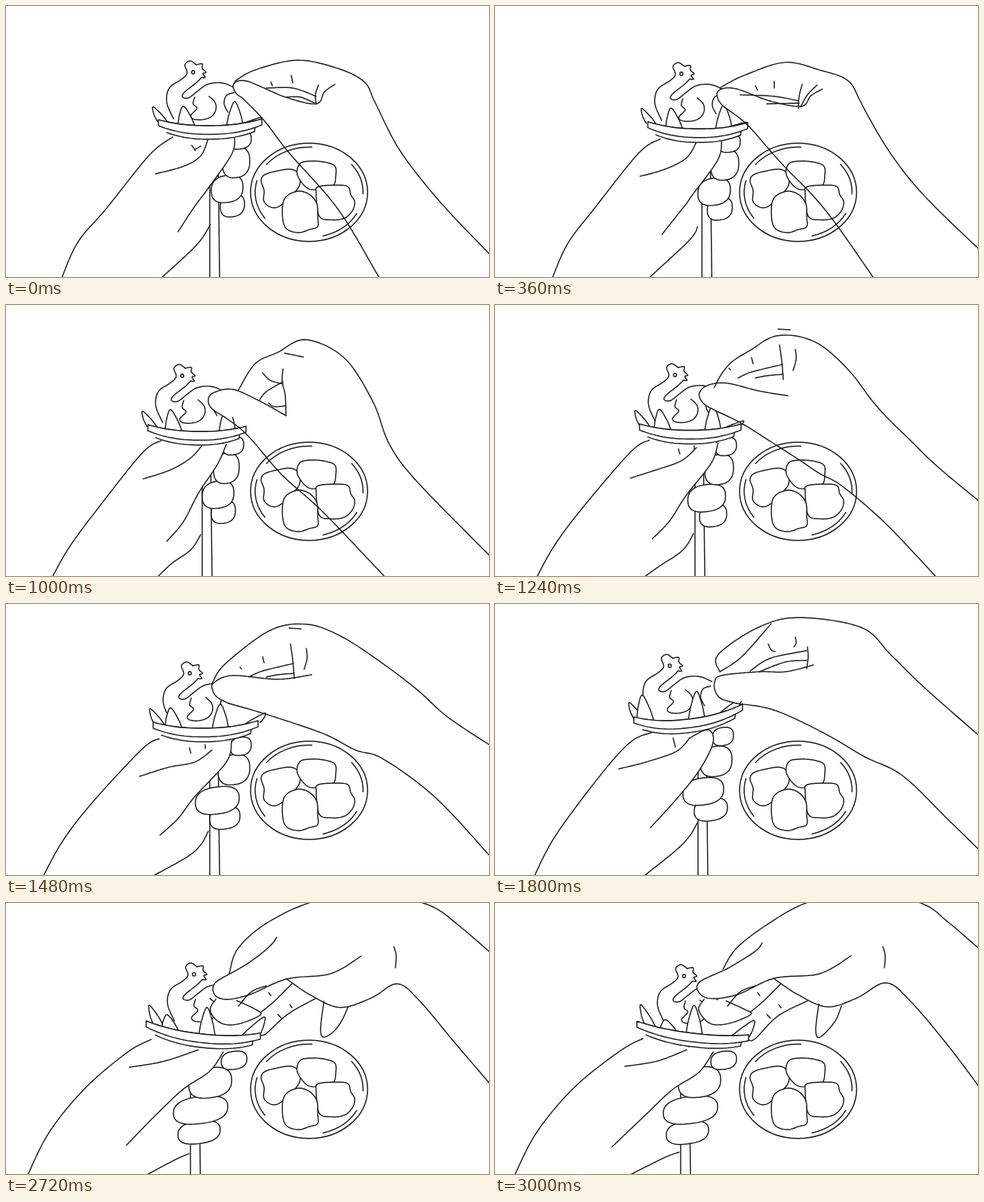
These frames come from a looping animation (640x360 px, 3.04 s). An HTML page with a canvas:

```html
<!DOCTYPE html>
<html lang="en">
<head>
<meta charset="utf-8">
<title>Hands arranging food</title>
<style>
html, body { margin: 0; width: 100%; height: 100%; overflow: hidden; background: #fff; }
canvas { display: block; width: 100vw; height: 100vh; }
</style>
</head>
<body>
<canvas width="640" height="360"></canvas>
<script>
const LOOP = 3040, SAMPLES = 90;
const ctx = document.querySelector('canvas').getContext('2d');

const lerp = (a, b, k) => a + (b - a) * k;
const blend = (a, b, k) => Array.isArray(a) ? a.map((v, i) => blend(v, b[i], k)) : lerp(a, b, k);
const points = s => s.split(' ').map(p => p.split(',').map(Number));

// Catmull-Rom spline as a fine polyline
function smooth(pts) {
  const out = [pts[0]];
  for (let i = 0; i < pts.length - 1; i++) {
    const b = pts[i], c = pts[i + 1], a = pts[i - 1] || b, d = pts[i + 2] || c;
    for (let u = 0.1; u < 1.05; u += 0.1) {
      out.push([0, 1].map(n => b[n] + u / 2 * (c[n] - a[n] +
        u * (2 * a[n] - 5 * b[n] + 4 * c[n] - d[n] + u * (3 * (b[n] - c[n]) + d[n] - a[n])))));
    }
  }
  return out;
}

// Evenly spaced points, so that strokes of two poses can blend
function resample(pts) {
  const len = [0];
  for (let i = 1; i < pts.length; i++) {
    len.push(len[i - 1] + Math.hypot(pts[i][0] - pts[i - 1][0], pts[i][1] - pts[i - 1][1]));
  }
  const step = len[len.length - 1] / SAMPLES;
  let i = 1;
  return Array.from({ length: SAMPLES + 1 }, (_, n) => {
    while (i < pts.length - 1 && len[i] < n * step) i++;
    return blend(pts[i - 1], pts[i], (n * step - len[i - 1]) / (len[i] - len[i - 1] || 1));
  });
}

const curve = s => smooth(points(s));
function loop(s) {
  const p = points(s);
  return smooth([...p.slice(-2), ...p, p[0], p[1]]).slice(20, -10);
}

// Key points of each pose; beads are x, y and half width, leaves are their tips.
const poses = [
  { at: 0, eye: '248,88', plate: '202,151 270,159 339,150', rod: '270,0',
    leaves: '195,134 235,133 303,127 338,148', beads: '310,178,15 305,208,18 293,243,21 300,265,16',
    arm: '72,366 95,314 133,269 190,198 221,174', fold: '198,223 235,213 258,199 268,176',
    grip: '303,174 299,197 268,242 248,269 228,300', palm: '207,360 240,330 258,311 271,290',
    top: '303,100 330,85 386,72 440,83 475,101 489,128 522,192 575,260 644,333',
    thumb: '436,104 422,114 411,130 370,121 320,100 302,103 304,115 313,122',
    edge: '313,122 342,152 375,195 440,270 494,360 520,404',
    creases: '345,109 380,109 411,120;372,121 390,121 409,129;411,130 410,118 414,105;351,101 353,106;378,92 380,102;246,185 251,192;250,191 258,186' },
  { at: 680, eye: '246,92', plate: '203,156 265,167 331,159', rod: '278,0',
    leaves: '194,138 232,138 303,135 327,160', beads: '311,186,14 304,214,19 288,250,22 296,273,17',
    arm: '76,366 97,318 132,267 190,194 217,179', fold: '187,229 215,221 250,204 267,183',
    grip: '298,183 292,211 258,256 248,271 215,307', palm: '204,360 235,331 262,307 266,296',
    top: '293,117 330,98 380,77 425,88 463,99 488,140 535,212 575,257 644,319',
    thumb: '432,116 415,124 402,136 360,131 315,117 291,121 289,133 298,147',
    edge: '298,147 330,166 385,222 430,266 507,360 540,400',
    creases: '325,118 370,120 402,126;360,130 403,129;402,136 403,120 407,104;405,134 414,118 427,105;345,106 348,112;370,100 370,109' },
  { at: 1000, eye: '233.5,94', plate: '188,159 255,168 318,161', rod: '260,0',
    leaves: '181,141 218,139 293,133 314,163', beads: '301,187,14 292,217,17 281,252,21 288,275,16',
    arm: '59,366 85,320 132,257 182,195 206,180', fold: '182,231 218,219 245,203 261,185',
    grip: '292,185 280,212 255,250 235,288 213,314', palm: '202,360 220,343 245,325 258,305',
    top: '308,113 330,78 360,63 397,46 448,70 486,128 508,185 545,235 645,337',
    thumb: '371,147 335,127 300,112 274,117 268,127 273,138 290,149',
    edge: '290,149 320,173 365,225 420,275 501,360 535,395',
    creases: '369,64 394,69;340,90 350,100 367,105;336,126 345,115 367,102;371,147 370,120 366,102 367,85;348,130 355,135 370,134' },
  { at: 1480, eye: '243.5,92', plate: '195,157 265,165 334,155', rod: '270,0',
    leaves: '191,139 218,138 284,133 343,145', beads: '311,189,14 302,220,21 280,261,29 290,284,20',
    arm: '47,366 75,315 115,263 180,193 203,179', fold: '177,229 215,217 250,210 273,194',
    grip: '299,182 292,210 250,256 228,285 204,307', palm: '197,360 240,336 258,320 268,302',
    top: '273,106 290,80 350,35 399,27 444,43 495,76 545,114 585,150 645,190',
    thumb: '405,94 360,100 300,95 275,105 274,115 280,124 295,132',
    edge: '295,132 343,146 420,172 463,194 500,206 570,258 645,339',
    creases: '375,32 391,33;322,97 340,89 381,79;345,97 360,94 382,92;382,99 380,75 377,53;398,59 399,72 395,87;310,84 312,86;340,70 342,78;243,191 245,198;264,187 264,192' },
  { at: 1800, eye: '231.5,82', plate: '184,150 257,153 328,133', rod: '269,0',
    leaves: '178,131 195,121 267,116 326,125', beads: '302,176,14 293,209,21 276,249,27 286,273,22',
    arm: '50,366 80,308 140,227 180,183 210,170', fold: '164,219 200,210 240,196 258,178',
    grip: '258,178 282,167 289,184 270,222 238,262 206,297', palm: '199,360 240,327 258,308 268,291',
    top: '298,90 295,68 345,33 400,18 485,31 525,68 570,112 645,178',
    thumb: '422,81 385,90 350,90 300,95 291,104 292,116 300,126 320,132',
    edge: '320,132 370,141 435,171 490,203 540,228 600,286 645,330',
    creases: '298,90 327,70 366,26;338,89 365,72 413,62;350,90 385,77 413,75;413,86 415,70 414,57;362,53 366,61 371,63;398,44 399,52 396,57;236,178 239,190' },
  { at: 2280, eye: '247,91', plate: '182,156 260,176 339,169', rod: '242,0',
    leaves: '185,137 194,138 270,143 341,144', beads: '301,209,17 270,240,29 256,275,36 257,304,28',
    arm: '31,366 60,305 105,247 155,200 187,183', fold: '150,220 195,212 256,195',
    grip: '286,198 270,221 235,246 200,279 167,318', palm: '200,360 220,348 241,336',
    top: '286,104 284,65 318,26 384,0 455,-14 533,0 580,22 645,76',
    thumb: '469,71 430,94 375,102 325,122 288,130 278,114 310,91 345,62 366,34',
    edge: '375,101 405,122 445,140 490,127 518,109 545,130 590,185 645,238',
    meat: '280,127 271,144 283,158 303,162 334,150 328,140 305,129',
    finger: '404,122 380,138 360,151 341,166', pinky: '409,125 404,165 408,179 425,172 444,141',
    creases: '376,103 352,125 336,140;518,66 519,75 516,84;313,133 327,130 345,123;305,69 312,79;317,55 321,61;268,224 284,221' },
  { at: 3000, eye: '250.5,97', plate: '188,157 262,173 336,175', rod: '246,0',
    leaves: '193,135 226,155 264,136 343,156', beads: '303,209,17 271,238,28 259,275,36 255,305,28',
    arm: '24,366 55,305 105,245 165,197 196,180', fold: '172,217 215,210 254,195',
    grip: '289,198 270,225 235,248 200,281 155,324', palm: '181,360 225,338 244,331',
    top: '302,88 320,60 360,29 412,0 485,-18 564,0 600,25 645,64',
    thumb: '472,70 430,94 370,100 320,122 280,126 269,107 310,86 345,64 354,53',
    edge: '369,100 400,121 440,138 480,126 518,106 550,130 600,189 645,249',
    meat: '277,128 270,142 285,160 310,160 339,148 330,141 306,130',
    finger: '414,130 375,150 345,180 336,182', pinky: '429,134 425,170 431,178 450,158 459,137',
    creases: '379,107 355,131 338,145;514,58 517,70 516,86;308,137 325,118 345,110;360,148 365,153;376,135 379,139;348,119 351,123' }
];

const RAW = ['eye', 'plate', 'rod', 'leaves', 'beads'];
const keys = poses.map(({ at, creases, ...rest }) => {
  const key = { at, creases: creases.split(';').map(curve), parts: {} };
  for (const [name, s] of Object.entries(rest)) {
    key.parts[name] = RAW.includes(name) ? points(s) : resample(curve(s));
  }
  return key;
});

// The bird, measured from its eye
const bird = [
  '4,-10 -4,-15 -11,-10 -8,1 -15,9 -30,19 -35,31 -34,44 -26,62',
  '11,7 4,14 -12,27 -14,33 -6,34 6,25 17,17 29,14 42,15 56,21',
  '4,-10 12,-11 12,-5 17,0 13,2 16,7 11,7',
  '21,32 29,40 30,50 24,59 12,63 0,62 -3,57 5,48 0,42 2,33',
  '54,27 44,31 41,42 46,53'
].map(curve);

const food = [
  '338,232 343,224 360,219 378,217 388,224 388,240 368,262 354,268 342,260 342,245',
  '390,209 407,206 425,208 436,213 437,225 433,239 412,244 398,241 386,224',
  '411,249 414,240 438,238 453,240 457,251 462,260 459,272 448,282 430,284 415,279',
  '367,262 374,251 389,246 403,251 412,263 413,280 413,293 402,297 388,301 373,297 367,285'
].map(loop);

function draw(pts, filled) {
  ctx.beginPath();
  pts.forEach(p => ctx.lineTo(p[0], p[1]));
  if (filled) ctx.fill();
  ctx.stroke();
}

function arc(rx, ry, from, to) {
  ctx.beginPath();
  ctx.ellipse(401.6, 247.5, rx, ry, 0, from * Math.PI / 180, to * Math.PI / 180);
  ctx.stroke();
}

function drawDish() {
  arc(77.5, 65.2, 0, 360);
  for (const [from, to] of [[218, 273], [145, 195], [322, 362], [28, 75]]) arc(71.5, 60, from, to);
  food.forEach(f => draw(f, true));
}

// A slightly squared, tilted oval
function drawBead([x, y, rx], i) {
  const ry = [12, 20, 18, 15][i];
  const round = v => Math.sign(v) * Math.abs(v) ** 0.8;
  draw(Array.from({ length: 41 }, (_, n) => {
    const a = n / 20 * Math.PI, dx = rx * round(Math.cos(a));
    return [x + dx, y + ry * round(Math.sin(a)) - dx * 0.12];
  }), true);
}

function drawPlate([l, m, r], tips) {
  const sag = m[1] - (l[1] + r[1]) / 2;
  const bow = (drop, from = 0, to = 1) => Array.from({ length: 31 }, (_, n) => {
    const u = lerp(from, to, n / 30), v = 1 - Math.abs(2 * u - 1) ** 2.3;
    return [lerp(l[0], r[0], u), lerp(l[1], r[1], u) + sag * v + drop * (0.7 + 0.3 * v)];
  });
  const spans = [[6, 21], [-7, 16], [-11, 11], [-32, -6]];
  tips.forEach((tip, i) => {
    const [a, b] = spans[i].map(dx => {
      const u = (tip[0] + dx - l[0]) / (r[0] - l[0]);
      return [tip[0] + dx, lerp(l[1], r[1], u) + sag * 4 * u * (1 - u) + 3];
    });
    const half = (p, dx) => [(p[0] + tip[0]) / 2 + dx, (p[1] + tip[1]) / 2];
    draw(smooth([a, half(a, -2), tip, half(b, 2), b]), true);
  });
  draw([...bow(0, 0.07, 0.94), ...bow(18, 0.08, 0.93).reverse()], true);
  const band = [...bow(0), ...bow(11.5).reverse()];
  draw([...band, band[0]], true);
}

function picture(t) {
  let i = 0;
  while (i < keys.length - 2 && keys[i + 1].at <= t) i++;
  const a = keys[i], b = keys[i + 1], k = (t - a.at) / (b.at - a.at);
  const near = k < 0.5 ? a : b, s = { ...near.parts };
  for (const name in a.parts) {
    if (b.parts[name]) s[name] = blend(a.parts[name], b.parts[name], k);
  }
  const [ex, ey] = s.eye[0], x = s.rod[0][0];

  ctx.fillStyle = '#fff';
  ctx.fillRect(0, 0, 640, 360);
  ctx.strokeStyle = '#1a1a1a';
  ctx.lineWidth = 1.45;
  ctx.lineCap = ctx.lineJoin = 'round';

  drawDish();
  draw([[x, 190], [x, 360]]);
  draw([[x + 11, 190], [x + 13, 360]]);
  [3, 2, 1, 0].forEach(n => drawBead(s.beads[n], n));
  draw(s.palm);

  // The near hand hides the stick and the beads behind it
  ctx.beginPath();
  [...s.arm, ...s.grip].forEach(p => ctx.lineTo(p[0], p[1]));
  ctx.fill();
  [s.arm, s.grip, s.fold].forEach(p => draw(p));

  ctx.save();
  ctx.translate(ex, ey);
  bird.forEach(p => draw(p));
  ctx.beginPath();
  ctx.ellipse(0, 0, 2, 2.3, 0, 0, 7);
  ctx.stroke();
  ctx.restore();

  if (s.meat) draw(s.meat, true);
  drawPlate(s.plate, s.leaves);
  draw(s.thumb, true);
  [s.top, s.edge, s.finger, s.pinky, ...near.creases].forEach(p => p && draw(p));
}

const late = [2120, 2280, 2440, 2560, 2720, 2800, 2920, 3000];
const snap = t => t < 40 ? 0 : t < 2120 ? t - (t - 40) % 80 : late.filter(s => s <= t).pop();

const start = performance.now();
(function tick() {
  picture(snap((performance.now() - start) % LOOP));
  requestAnimationFrame(tick);
})();
</script>
</body>
</html>
```
